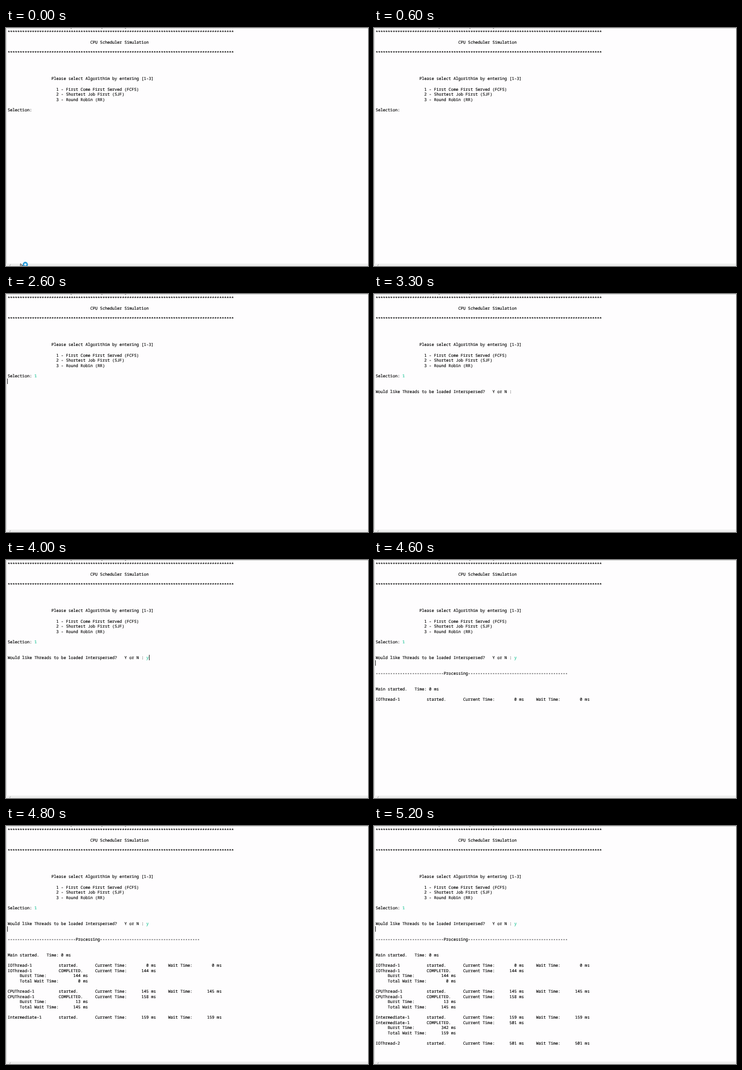
An HTML page that plays this animation: 600 by 394 pixels, repeating every 5300 ms.

```html
<!DOCTYPE html>
<html lang="en">
<head>
<meta charset="utf-8">
<title>CPU Scheduler Simulation</title>
<style>
  html, body { margin: 0; width: 100%; height: 100%; overflow: hidden; background: #fefdfe; }
  .stage { position: relative; width: 600px; height: 394px; overflow: hidden; }
  .stage > * { position: absolute; }

  pre {
    left: 2.7px; top: 2.7px; margin: 0;
    font: 6.72px/8.63px "Noto Sans Mono", "DejaVu Sans Mono", monospace;
    font-variant-ligatures: none;
    text-rendering: geometricPrecision;
    color: #000;
    -webkit-text-stroke: .14px;
  }
  .in { color: #14c193; }

  .top { left: 0; top: 0; width: 600px; height: 1px; background: #d4d4d4; }
  .left { left: 0; top: 0; width: 1px; height: 390px; background: #d9d9d9; border-right: 1px solid #f3f3f3; }
  .bar { left: 0; top: 390px; width: 600px; height: 4px; background: #eeeeee; }
  .cut { top: 0; height: 1px; background: #777; }

  /* 5300 ms loop, all changes are hard cuts */
  .show, .caret, .arrow, .beam { animation: 5300ms step-end infinite; }
  .show { visibility: hidden; }
  .one { animation-name: one; }
  .ask { animation-name: ask; }
  .yes { animation-name: yes; }
  .run { animation-name: run; }
  .cpu { animation-name: cpu; }
  .mid { animation-name: mid; }
  .end { animation-name: end; }
  @keyframes one { 0% { visibility: hidden } 39.6%, 100% { visibility: visible } }
  @keyframes ask { 0% { visibility: hidden } 52.8%, 100% { visibility: visible } }
  @keyframes yes { 0% { visibility: hidden } 75.45%, 100% { visibility: visible } }
  @keyframes run { 0% { visibility: hidden } 86.77%, 100% { visibility: visible } }
  @keyframes cpu { 0% { visibility: hidden } 88.65%, 100% { visibility: visible } }
  @keyframes mid { 0% { visibility: hidden } 90.54%, 100% { visibility: visible } }
  @keyframes end { 0% { visibility: hidden } 96.2%, 100% { visibility: visible } }

  .caret { left: 0; top: 0; width: 1px; height: 9px; background: #333; animation-name: caret; }
  @keyframes caret {
    0%     { opacity: 0; transform: translate(47px, 131px) }
    20.73% { opacity: 1; transform: translate(47px, 131px) }
    30.16% { opacity: 0; transform: translate(47px, 131px) }
    39.6%  { opacity: 1; transform: translate(51px, 131px) }
    49.03% { opacity: 1; transform: translate(2px, 140px) }
    62.24% { opacity: 0; transform: translate(2px, 140px) }
    71.67% { opacity: 1; transform: translate(2px, 140px) }
    75.45% { opacity: 1; transform: translate(237px, 157px) }
    86.77%, 100% { opacity: 1; transform: translate(2px, 166px) }
  }

  .arrow { left: 22px; top: 384px; animation-name: arrow; }
  @keyframes arrow { 0% { opacity: 1 } 1.87%, 100% { opacity: 0 } }

  .beam { left: 0; top: 0; animation-name: beam; }
  @keyframes beam {
    0%    { opacity: 0; transform: translate(66px, 139px) }
    1.87% { opacity: 1; transform: translate(66px, 139px) }
    3.76% { opacity: 1; transform: translate(165px, 20px) }
    5.64% { opacity: 1; transform: translate(271px, 4px) }
    7.53%, 100% { opacity: 0; transform: translate(271px, 4px) }
  }
</style>
</head>
<body>
<div class="stage">
  <div class="top"></div>
  <div class="left"></div>
  <div class="cut" style="left:107px;width:2px"></div>
  <div class="cut" style="left:158px;width:2px"></div>
  <div class="cut" style="left:197px;width:2px"></div>
  <div class="bar"></div>
  <svg style="left:4px;top:390px" width="6" height="4"><path d="M4 1 L2 3 L4 5" fill="none" stroke="#aaa" stroke-width=".8"/></svg>

<pre>
*********************************************************************************************

                                  CPU Scheduler Simulation

*********************************************************************************************




                  Please select Algorithim by entering [1-3]

                    1 - First Come First Served (FCFS)
                    2 - Shortest Job First (SJF)
                    3 - Round Robin (RR)

Selection: <span class="show one in">1</span>


<span class="show ask">Would like Threads to be loaded Interspersed?   Y or N : </span><span class="show yes in">y</span>


<span class="show run">----------------------------Processing-----------------------------------------


Main started.   Time: 0 ms

IOThread-1           started.       Current Time:        0 ms     Wait Time:        0 ms</span>
<span class="show cpu">IOThread-1           COMPLETED.     Current Time:      144 ms
     Burst Time:           144 ms
     Total Wait Time:        0 ms

CPUThread-1          started.       Current Time:      145 ms     Wait Time:      145 ms</span>
<span class="show mid">CPUThread-1          COMPLETED.     Current Time:      158 ms
     Burst Time:            13 ms
     Total Wait Time:      145 ms

Intermediate-1       started.       Current Time:      159 ms     Wait Time:      159 ms</span>
<span class="show end">Intermediate-1       COMPLETED.     Current Time:      501 ms
     Burst Time:           342 ms
     Total Wait Time:      159 ms

IOThread-2           started.       Current Time:      501 ms     Wait Time:      501 ms</span>
</pre>

  <div class="caret"></div>
  <svg class="arrow" width="16" height="10">
    <path d="M2 6 V10 H6 Z" fill="#fff" stroke="#222" stroke-width=".9"/>
    <circle cx="10" cy="7.5" r="3.2" fill="#d8f0fc" stroke="#2b9bd8" stroke-width="2.4"/>
  </svg>
  <svg class="beam" width="5" height="10">
    <path d="M.5 .5 H2 M3 .5 H4.5 M2.5 1 V9 M.5 9.5 H2 M3 9.5 H4.5" fill="none" stroke="#333" stroke-width=".9"/>
  </svg>
</div>
</body>
</html>
```
